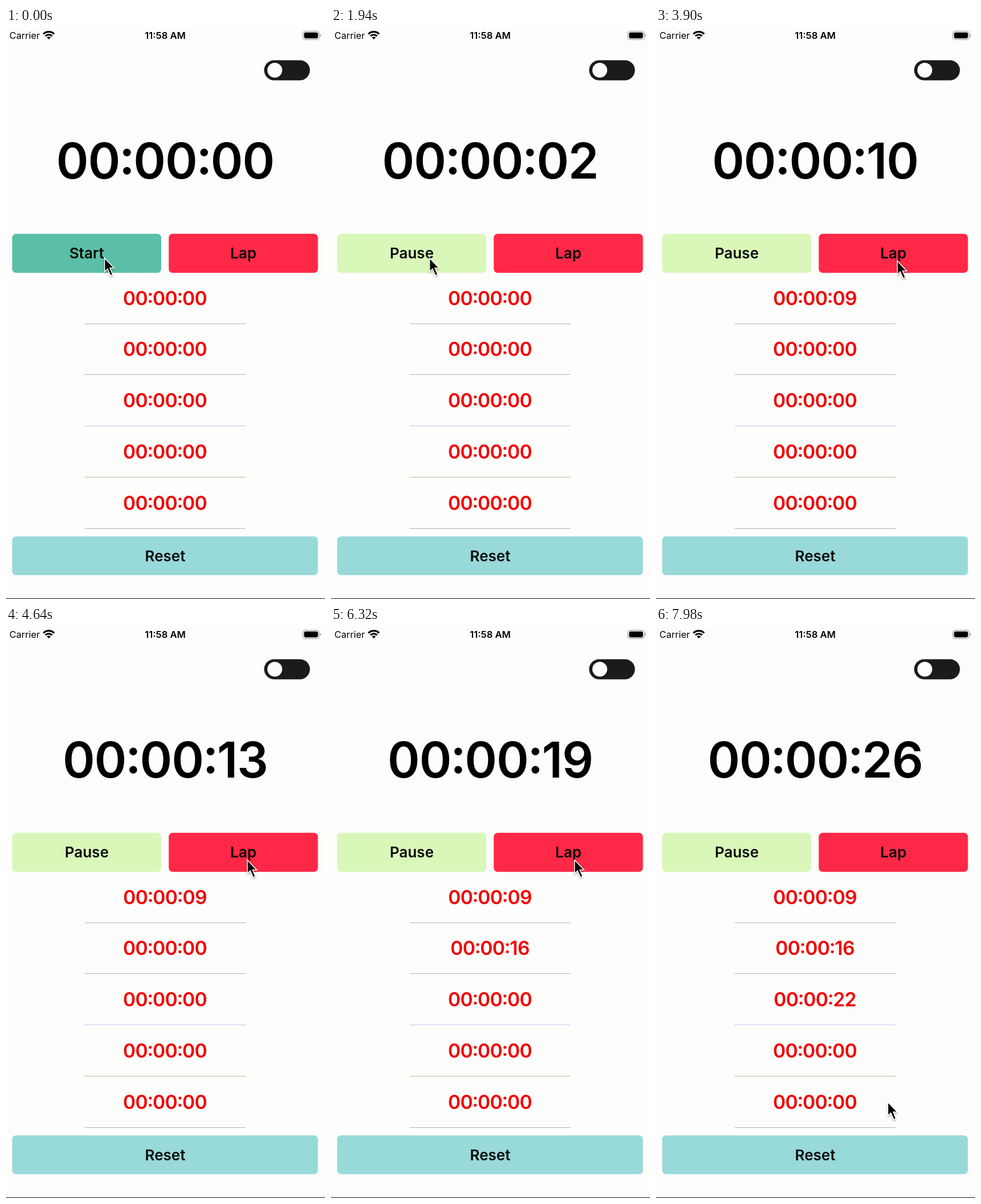
Animation of 559x1001 px, one loop 8 s. Source, as an HTML page:

```html
<!DOCTYPE html>
<html lang="en">
<head>
<meta charset="utf-8">
<title>Stopwatch</title>
<style>
  html, body { margin: 0; width: 100%; height: 100%; overflow: hidden; background: #fdfdfc; }
  svg { display: block; width: 100%; height: 100%; }
  text { font-family: Inter, Roboto, sans-serif; font-weight: 600; font-optical-sizing: none; text-anchor: middle; }
  .clock { font-size: 86px; letter-spacing: -1px; }
  .lap { font-size: 33.6px; letter-spacing: -.65px; fill: #f00505; }
  .label { font-size: 26px; fill: #080808; }
  .status { font-size: 16.6px; }
  .carrier { font-size: 16.3px; font-weight: 400; text-anchor: start; }
  #cursor { filter: drop-shadow(0 2px 1.5px rgba(0, 0, 0, .3)); }
</style>
</head>
<body>
<svg viewBox="0 0 559 1001">
  <rect width="559" height="1001" fill="#fdfdfc"/>
  <rect y="1000" width="559" height="1" fill="#111"/>

  <text class="carrier" x="6" y="19">Carrier</text>
  <g fill="none" stroke="#000">
    <path d="M65.6 10.6A13.3 13.3 0 0 1 84.4 10.6" stroke-width="3.2"/>
    <path d="M69.1 14.1A8.4 8.4 0 0 1 80.9 14.1" stroke-width="2.9"/>
  </g>
  <path d="M75 20L71.6 16.6A4.8 4.8 0 0 1 78.4 16.6Z"/>
  <text class="status" x="279" y="19">11:58 AM</text>
  <rect x="520.2" y="5.7" width="28.6" height="14.6" rx="4" fill="none" stroke="#a4a4a4" stroke-width="1.3"/>
  <rect x="522.3" y="7.8" width="24.4" height="10.4" rx="2.4"/>
  <path d="M550.3 10.6Q552.3 11.2 552.3 13T550.3 15.4Z" fill="#a4a4a4"/>

  <rect x="452.3" y="56.4" width="80.3" height="35.4" rx="17.7" fill="#1b1b1a"/>
  <circle cx="471" cy="74" r="13" fill="#fdfdfc"/>

  <text class="clock" id="clock" x="279" y="263.8"></text>

  <rect id="startBox" x="10.8" y="360.8" width="261.2" height="68.4" rx="7"/>
  <text class="label" id="startLabel" x="141.5" y="404">Start</text>
  <rect x="285.2" y="360.8" width="261.4" height="68.4" rx="7" fill="#ff2847"/>
  <text class="label" x="416" y="404">Lap</text>

  <g id="laps"></g>

  <rect x="10.8" y="891.3" width="535.8" height="68" rx="7" fill="#98d9d9"/>
  <text class="label" x="279" y="935">Reset</text>

  <path id="cursor" d="M1.5 3.2V23.5L6.2 18.9L11.5 31L14.1 29.9L9 18H15.6Z"
    stroke="#fff" stroke-width="3" stroke-miterlimit="10" paint-order="stroke"/>
</svg>
<script>
  const LOOP = 8000;
  const START = 29;
  // Step on which each lap is taken, and its seconds
  const LAPS = [[81, 9], [115, 16], [150, 22]];
  // [step, elapsed seconds]
  const SECONDS = [[START, 0], [35, 1], [40, 2], [65, 6], [83, 10], [114, 16], [137, 20], [168, 26], [172, 26.7]];
  // [step, x, y]
  const POINTER = [[48, 172, 402], [58, 422, 407], [118, 422, 407], [122, 426, 407], [154, 426, 407], [168, 405.5, 831.5]];
  const LINES = ['#b3b3b5', '#b3b3b3', '#c3c3ee', '#bbbb9c', '#b3b3b3'];

  // Colons sit at mid-height of the digits, slightly tightened
  const COLON = '<tspan dx="-.015em" dy="-.091em">:</tspan>';
  const PAIR = '<tspan dx="-.015em" dy=".091em">00</tspan>';
  const TIME = '00' + (COLON + PAIR).repeat(2);

  const $ = id => document.getElementById(id);
  const ease = p => p * p * (3 - 2 * p);

  function setText(el, text) {
    if (el.textContent !== text) el.textContent = text;
  }

  function setSeconds(el, s) {
    setText(el.lastChild, String(s).padStart(2, '0'));
  }

  function sample(table, step, col, curve = p => p) {
    if (step <= table[0][0]) return table[0][col];
    for (let i = 1; i < table.length; i++) {
      const a = table[i - 1], b = table[i];
      if (step < b[0]) return a[col] + (b[col] - a[col]) * curve((step - a[0]) / (b[0] - a[0]));
    }
    return table[table.length - 1][col];
  }

  // Steps last 20, 100 and 20 ms in turn
  function stepAt(ms) {
    const r = ms % 140;
    return 3 * Math.floor(ms / 140) + (r < 20 ? 0 : r < 120 ? 1 : 2);
  }

  $('clock').innerHTML = TIME;
  $('laps').innerHTML = LINES.map((color, i) => {
    const y = i * 89.75;
    return `<text class="lap" x="278.5" y="${485.5 + y}">${TIME}</text>
      <rect x="138" y="${Math.floor(518 + y)}" width="282" height="1" fill="${color}"/>`;
  }).join('');
  const lapTexts = document.querySelectorAll('.lap');

  function draw(ms) {
    const step = stepAt(ms);
    const running = step >= START;
    setSeconds($('clock'), Math.floor(sample(SECONDS, step, 1)));
    setText($('startLabel'), running ? 'Pause' : 'Start');
    $('startBox').setAttribute('fill', running ? '#d9f7b9' : '#5abfa6');
    LAPS.forEach(([at, s], i) => setSeconds(lapTexts[i], step >= at ? s : 0));
    const x = sample(POINTER, step, 1, ease), y = sample(POINTER, step, 2, ease);
    $('cursor').setAttribute('transform', `translate(${x} ${y})`);
  }

  const began = performance.now();
  function tick() {
    draw((performance.now() - began) % LOOP);
    requestAnimationFrame(tick);
  }
  draw(0);
  requestAnimationFrame(tick);
</script>
</body>
</html>
```
